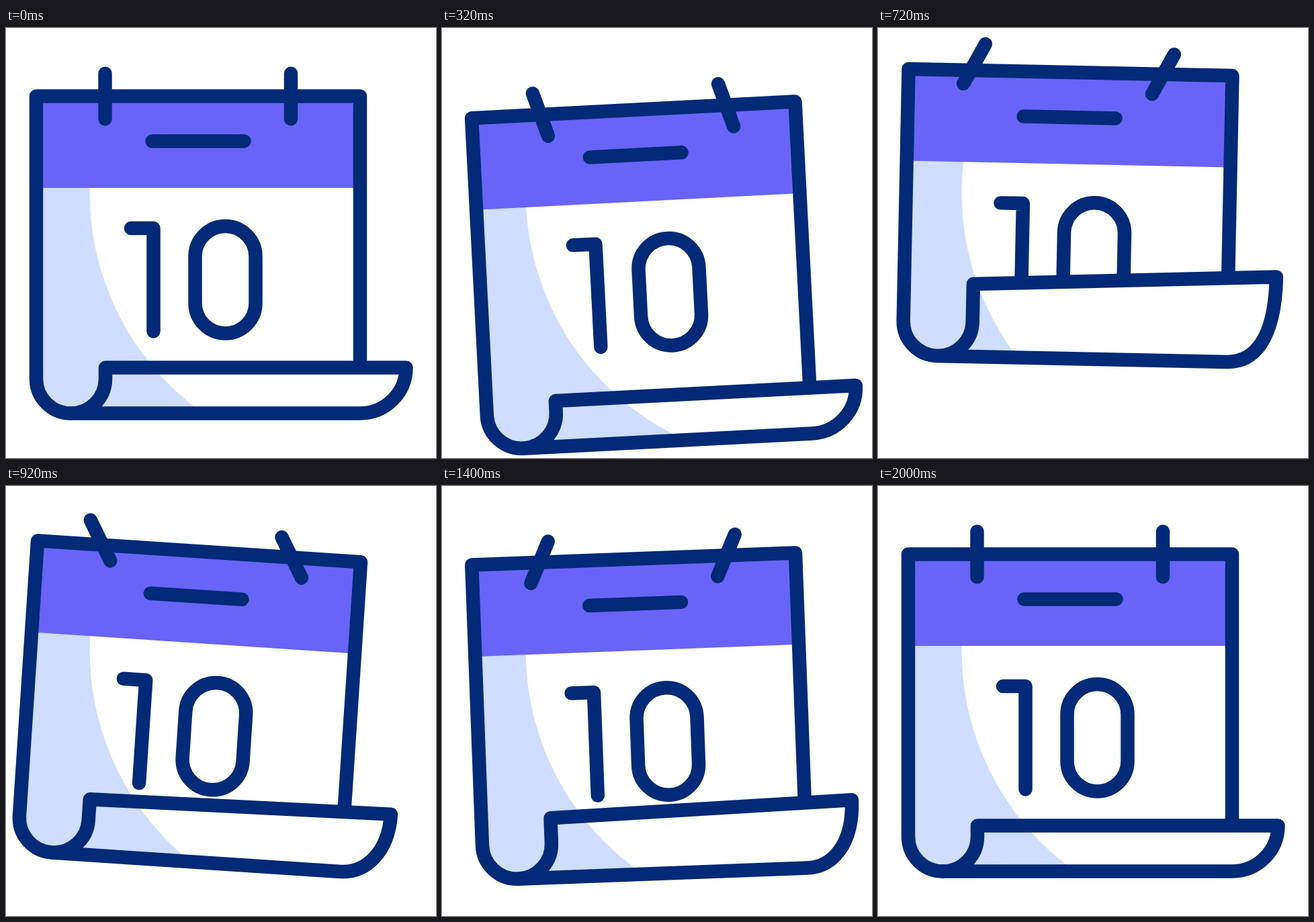
Animation, 640 px wide and 640 px high, one loop 3 s. Source, as an HTML page with a canvas:

```html
<!DOCTYPE html>
<html lang="en">
<head>
<meta charset="utf-8">
<title>Calendar</title>
<style>
  html, body { margin: 0; width: 100%; height: 100%; overflow: hidden; background: #fff; }
  canvas { display: block; }
</style>
</head>
<body>
<canvas id="stage" width="640" height="640"></canvas>
<script>
const ctx = document.getElementById('stage').getContext('2d');
const NAVY = '#032a76', PURPLE = '#6864f8', PALE = '#cfddff';
const LOOP = 3000, STEP = 40, PIVOT = { x: 286, y: 125 };
const ROUND = 0.5523; // Bezier handle of a quarter circle

const rad = deg => deg * Math.PI / 180;

// Crouch, jump, landing and settling are overlapping smooth bumps.
function poseAt(t) {
  const bump = (from, to) =>
    t > from && t < to ? Math.sin(Math.PI * (t - from) / (to - from)) ** 2 : 0;
  return {
    lift: 21.5 * bump(0, 560) - 35.5 * bump(440, 1000) + 12.5 * bump(800, 1620),
    tilt: rad(-3.4 * bump(0, 840) + 4.1 * bump(580, 1180) - 2.2 * bump(840, 1860)),
    stretch: 25 * bump(0, 800) - 53 * bump(540, 985) + 4 * bump(900, 1400) - 19.5 * bump(1320, 2000),
    curl: 46 * bump(540, 1010) + 26 * bump(1080, 2000),
    swing: rad(-20 * bump(0, 640) + 30 * bump(520, 880) - 26 * bump(760, 1080)
      + 86 * bump(940, 1500) - 43 * bump(1360, 1920)),
    slideX: -9.3 * bump(450, 1550),
    slideY: -10 * bump(320, 1200)
  };
}

function polyline(...pts) {
  const p = new Path2D();
  pts.forEach(([x, y]) => p.lineTo(x, y));
  return p;
}

// The pale shadow has a round edge that stays fixed on the stage.
function fillPaper(path) {
  ctx.save();
  ctx.clip(path);
  ctx.resetTransform();
  ctx.fillStyle = PALE;
  ctx.fillRect(0, 0, 640, 640);
  ctx.fillStyle = '#fff';
  ctx.beginPath();
  ctx.arc(528.5, 245, 404, 0, Math.PI * 2);
  ctx.fill();
  ctx.restore();
}

function drawPage({ stretch, curl }) {
  const low = 573.5 + stretch, mid = low - 51.5;
  const yl = 505.5 + stretch - curl, yr = 505.5 + stretch - 1.5 * curl;
  const xr = 595.5 + 0.08 * curl;
  const edgeY = yl + (yr - yl) * (527 - 148) / (xr - 148);

  const sheet = polyline([45, 101.5], [527, 101.5], [527, edgeY], [148, yl], [148, mid]);
  sheet.arc(96.5, mid, 51.5, 0, Math.PI);
  sheet.closePath();
  fillPaper(sheet);

  ctx.fillStyle = PURPLE;
  ctx.fillRect(45, 101.5, 482, 136.5);

  ctx.stroke(polyline([217.5, 168.5], [354.5, 168.5]));
  ctx.stroke(polyline([186, 298], [219.5, 298], [219.5, 451.5]));
  const zero = new Path2D();
  zero.roundRect(281.5, 295, 90, 159.5, 45);
  ctx.stroke(zero);

  const frame = polyline([527, edgeY], [527, 101.5], [45, 101.5], [45, mid]);
  frame.arc(96.5, mid, 51.5, Math.PI, Math.PI / 2, true);
  ctx.stroke(frame);

  const flap = polyline([148, yl], [xr, yr]);
  const bulge = ROUND + 0.005 * curl;
  flap.bezierCurveTo(xr, yr + (low - yr) * bulge, 527 + (xr - 527) * ROUND, low, 527, low);
  flap.lineTo(96.5, low);
  flap.arc(96.5, mid, 51.5, Math.PI / 2, 0, true);
  flap.closePath();
  fillPaper(flap);
  ctx.stroke(flap);
}

// Moves to the tilted page, shifted by (dx, dy).
function enterPage({ lift, tilt }, dx = 0, dy = 0) {
  ctx.translate(PIVOT.x + dx, PIVOT.y + lift + dy);
  ctx.rotate(tilt);
  ctx.translate(-PIVOT.x, -PIVOT.y);
}

function drawRing(pose, x, dx, dy) {
  ctx.save();
  enterPage(pose, dx, dy);
  ctx.translate(x, 101.5);
  ctx.rotate(pose.swing - pose.tilt);
  ctx.stroke(polyline([0, -33.7], [0, 33.7]));
  ctx.restore();
}

function draw(t) {
  const pose = poseAt(t);
  ctx.fillStyle = '#fff';
  ctx.fillRect(0, 0, 640, 640);
  ctx.strokeStyle = NAVY;
  ctx.lineWidth = 20.5;
  ctx.lineCap = ctx.lineJoin = 'round';

  ctx.save();
  enterPage(pose);
  drawPage(pose);
  ctx.restore();

  drawRing(pose, 147.5, pose.slideX, pose.slideY);
  drawRing(pose, 424, 0, 0);
}

const start = performance.now();
function tick() {
  const t = (performance.now() - start) % LOOP;
  draw(Math.floor(t / STEP) * STEP);
  requestAnimationFrame(tick);
}
tick();
</script>
</body>
</html>
```
